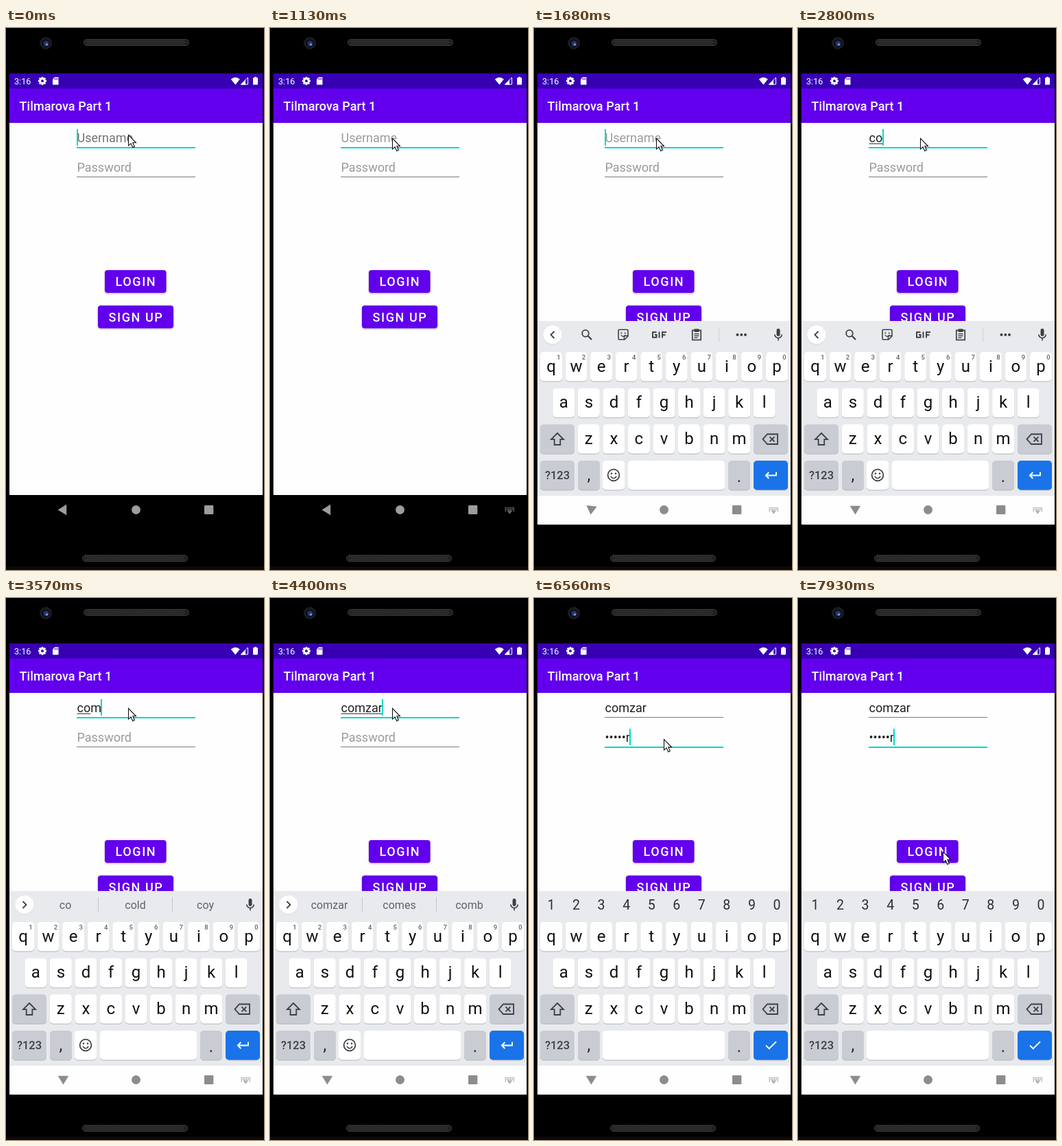
An HTML page with a canvas for the animation above (8 s loop, 376 by 788 pixels).

```html
<!DOCTYPE html>
<html lang="en">
<head>
<meta charset="utf-8">
<title>Login screen</title>
<style>
html, body { margin: 0; width: 100%; height: 100%; overflow: hidden; background: #000; }
canvas { display: block; width: 376px; height: 788px; }
</style>
</head>
<body>
<canvas id="stage"></canvas>
<script>
const W = 376, H = 788, LOOP = 8000;
const canvas = document.getElementById('stage');
const ctx = canvas.getContext('2d');
const ratio = window.devicePixelRatio || 1;
canvas.width = W * ratio;
canvas.height = H * ratio;

const PURPLE = '#6200ee', TEAL = '#03dac5', INK = '#212121', HINT = '#9b9b9b', ICON = '#3c4043';

// Each timeline lists [start in ms, value]; the value holds until the next one.
const userText = [[0, ''], [2340, 'c'], [2800, 'co'], [3450, 'com'], [4010, 'comz'], [4160, 'comza'], [4280, 'comzar']];
const composed = [[0, 0], [2800, 2], [3860, 3], [4160, 4], [4400, 6], [5200, 0]];
const passText = [[0, ''], [5630, '•o'], [6030, '••m'], [6310, '••••a'], [6560, '•••••r']];
const caretOn = [[0, true], [150, false], [700, true], [1130, false], [1680, true], [7020, false], [7540, true]];
const barWords = [[0, null], [3050, ['co', 'cold', 'coy']], [3860, ['com', 'come', 'comb']],
  [4400, ['comzar', 'comes', 'comb']], [5200, []]];
const pointer = [[0, [178, 155]], [580, [178, 160]], [4780, [180, 170]], [4930, [184, 218]], [5080, [189, 205]],
  [6870, [209, 242]], [7020, [211, 290]], [7140, [213, 326]], [7290, [211.5, 363]], [7540, [212, 384]], [7930, [211, 368.5]]];
const backTurn = [[0, 0], [1680, -83], [1800, -90]];

function at(line, t) {
  let value = line[0][1];
  for (const [start, v] of line) if (t >= start) value = v;
  return value;
}

function rect(x, y, w, h, color) {
  ctx.fillStyle = color;
  ctx.fillRect(x, y, w, h);
}

function round(x, y, w, h, r, color) {
  ctx.fillStyle = color;
  ctx.beginPath();
  ctx.roundRect(x, y, w, h, r);
  ctx.fill();
}

function disc(x, y, r, color) {
  ctx.fillStyle = color;
  ctx.beginPath();
  ctx.arc(x, y, r, 0, 7);
  ctx.fill();
}

function ring(x, y, r, width, color, from = 0, to = Math.PI * 2) {
  ctx.strokeStyle = color;
  ctx.lineWidth = width;
  ctx.beginPath();
  ctx.arc(x, y, r, from, to);
  ctx.stroke();
}

function shape(d, fill, stroke, width = 1) {
  const path = new Path2D(d);
  if (fill) { ctx.fillStyle = fill; ctx.fill(path); }
  if (stroke) { ctx.strokeStyle = stroke; ctx.lineWidth = width; ctx.stroke(path); }
}

function text(str, x, y, size, color, { weight = 400, align = 'left', gap = 0 } = {}) {
  ctx.font = `${weight} ${size}px Roboto, sans-serif`;
  ctx.letterSpacing = gap + 'px';
  ctx.textAlign = align;
  ctx.fillStyle = color;
  ctx.fillText(str, x, y);
}

function widthOf(str) {
  ctx.font = '400 18px Roboto, sans-serif';
  ctx.letterSpacing = '0px';
  return ctx.measureText(str).width;
}

function moved(x, y, draw, turn = 0) {
  ctx.save();
  ctx.translate(x, y);
  ctx.rotate(turn * Math.PI / 180);
  draw();
  ctx.restore();
}

function grille(x, y) {
  round(x, y, 154, 10, 5, '#3a3a3a');
  round(x + 1, y + 1, 152, 8, 4, '#202020');
  for (let row = 0; row < 3; row++)
    for (let i = 0; i < 48; i++)
      rect(x + 4 + i * 3 + (row % 2) * 1.5, y + 2 + row * 2.2, 1.4, 1.4, '#414141');
}

function phone() {
  rect(0, 0, W, H, '#000');
  grille(113, 16);
  grille(111, 766);
  rect(0, 783, W, 5, '#0b090c');
  disc(58, 22, 9, '#1b1c1e');
  disc(58, 22, 6, '#0c1120');
  disc(58.5, 22.5, 3.8, '#23366f');
  disc(59.5, 24, 1.7, '#7b92d2');
}

function statusBar() {
  rect(5, 66, 369, 22, '#3700b3');
  text('3:16', 12, 81.5, 12.6, '#fff');
  for (let i = 0; i < 8; i++) moved(53, 77, () => rect(-1.4, -6, 2.8, 3, '#fff'), i * 45);
  ring(53, 77, 3.3, 2.6, '#fff');
  shape('M71 71.5H76.5V82.5H68V74.5Z', '#fff');
  for (const x of [71, 73, 75]) rect(x - 0.4, 73, 1, 2.4, '#3700b3');
  shape('M327.8 74.5Q334.3 69 340.8 74.5L334.3 82.5Z', '#fff');
  shape('M352.5 72V82H342.5Z', null, '#fff', 1);
  shape('M349 75.5V82.5H342Z', '#fff');
  round(360, 72.3, 7, 10.2, 1, '#fff');
  rect(362, 71, 3, 2, '#fff');
}

function button(x, y, w, h, label) {
  ctx.save();
  ctx.shadowColor = 'rgba(0,0,0,.35)';
  ctx.shadowBlur = 3 * ratio;
  ctx.shadowOffsetY = ratio;
  round(x, y, w, h, 4, PURPLE);
  ctx.restore();
  text(label, x + 15.5, y + 23.3, 18, '#fff', { weight: 500, gap: 1.6 });
}

function field(y, value, hint, hintColor, focused, caret, lined = 0) {
  const x = 103.5;
  text(value || hint, x, y, 18, value ? INK : hintColor);
  if (lined) rect(x, y + 1.7, widthOf(value.slice(0, lined)), 1, INK);
  if (focused) rect(103, y + 7, 173, 2, TEAL);
  else rect(103, y + 7, 173, 1, '#7a7a7a');
  if (focused && caret) rect(Math.round(x + widthOf(value) - 0.5), y - 19, 2, 24, TEAL);
}

function page(t) {
  rect(5, 138, 369, t >= 1560 ? 584 : 541, '#fefefe');
  statusBar();
  rect(5, 88, 369, 50, PURPLE);
  text('Tilmarova Part 1', 19.5, 119.5, 18, '#fff', { weight: 500, gap: 0.1 });
  const onPass = t >= 5200, caret = at(caretOn, t);
  field(166, at(userText, t), 'Username', t < 150 ? '#737373' : HINT, !onPass, caret, at(composed, t));
  field(209, at(passText, t), 'Password', HINT, onPass, caret);
  button(144, 352, 89.5, 33, 'LOGIN');
  button(134, 403.5, 110, 33, 'SIGN UP');
}

function key(x, y, w, color = '#fff') {
  round(x, y + 1, w, 42.5, 5, '#b4b7bb');
  round(x, y, w, 42.5, 5, color);
}

function letters(row, x, y, hints) {
  [...row].forEach((ch, i) => {
    const cx = x + i * 36.55;
    key(cx - 16, y, 32);
    text(ch, cx, y + 28.5, 24, '#111', { align: 'center' });
    if (hints) text((i + 1) % 10, cx + 11, y + 10.5, 9.5, '#5f6368', { align: 'center', weight: 500 });
  });
}

function chevron(right) {
  disc(27, 447, 13.5, '#d3d5d8');
  disc(27, 446, 13.5, '#fff');
  const s = right ? 1 : -1;
  shape(`M${27 - 2.5 * s} 441L${27 + 2.5 * s} 446L${27 - 2.5 * s} 451`, null, ICON, 1.8);
}

function mic() {
  round(353.5, 437, 5, 11, 2.5, ICON);
  ring(356, 445.5, 5.2, 1.6, ICON, 0, Math.PI);
  rect(355.2, 450.5, 1.6, 4, ICON);
}

function tools() {
  ring(75, 444, 4.8, 1.8, ICON);
  shape('M78.5 447.5L84 453', null, ICON, 2.2);
  shape('M124.5 438.5H135.5Q137 438.5 137 440V448L132 453H124.5Q123 453 123 451.5V440Q123 438.5 124.5 438.5Z', null, ICON, 1.6);
  shape('M137 447.5H131.5V453', null, ICON, 1.4);
  disc(127.3, 443.5, 1.1, ICON);
  disc(132.7, 443.5, 1.1, ICON);
  ring(130, 445.5, 3, 1.3, ICON, 0.2, 2.9);
  shape('M178.5 442.3H173V449.7H178.5V446H176M182.5 441.5V450.5M187 450.5V442.3H193M187 446.3H191.5', null, ICON, 1.9);
  ctx.strokeStyle = ICON;
  ctx.lineWidth = 1.7;
  ctx.strokeRect(230.8, 439.5, 12.4, 14);
  rect(233.5, 437.5, 7, 4.5, ICON);
  for (const y of [444, 446.8, 449.6]) rect(233.5, y, y > 449 ? 5 : 7, 1.4, ICON);
  rect(269, 436, 1, 20, '#cfd1d5');
  for (const x of [296.5, 302.3, 308]) disc(x, 446, 2, ICON);
}

function topRow(t) {
  if (t >= 5320) {
    for (let i = 0; i < 10; i++)
      text((i + 1) % 10, 25 + i * 36.55, 453, 19.5, '#2c2e31', { align: 'center' });
    return;
  }
  const words = at(barWords, t);
  chevron(words);
  mic();
  if (!words) return tools();
  words.forEach((word, i) => text(word, 86.5 + i * 102, 451.7, 16, '#5f6368', { align: 'center' }));
  if (words.length) for (const x of [134, 242]) rect(x, 435, 1, 21, '#c3c6ca');
}

function keyboard(t) {
  const numeric = t >= 5320, gray = '#c9ccd3';
  rect(5, 426, 369, 254, '#e8eaed');
  topRow(t);
  letters('qwertyuiop', 25, 471, !numeric);
  letters('asdfghjkl', 43.3, 523.7);
  letters('zxcvbnm', 79.8, 576.3);

  key(9, 576.3, 50, gray);
  shape('M34 589L43 598.2H38.3V606H29.7V598.2H25Z', null, ICON, 1.8);
  key(320, 576.3, 50, gray);
  shape('M340 590.5H355V605H340L333.5 597.8Z', null, ICON, 1.8);
  shape('M343.5 594.3L350.5 601.3M350.5 594.3L343.5 601.3', null, ICON, 1.8);

  key(9, 629, 50, gray);
  text('?123', 34, 656.3, 16.5, ICON, { weight: 500, align: 'center' });
  key(64, 629, 32, gray);
  text(',', 79.8, 658, 24, '#222', { align: 'center' });
  if (!numeric) {
    key(100, 629, 32);
    ring(116, 650, 8.4, 1.7, ICON);
    disc(113, 647.7, 1.3, ICON);
    disc(119, 647.7, 1.3, ICON);
    ring(116, 650.7, 4, 1.6, ICON, 0.25, 2.9);
  }
  key(numeric ? 100 : 137, 629, numeric ? 178 : 141);
  key(283, 629, 32, gray);
  text('.', 299, 660, 24, '#222', { align: 'center' });
  key(320, 629, 50, '#1a73e8');
  if (numeric) shape('M338 650.5L342.7 655.2L353 645', null, '#fff', 1.9);
  else shape('M353 645.5V650.5H338M342.3 646L337.8 650.5L342.3 655', null, '#fff', 1.9);
}

function navBar(t) {
  const color = t >= 1560 ? '#8c8c8c' : '#9d9d9d';
  moved(83, 700, () => shape('M-7.5 .5L5.2 -7.3V8.2Z', color), at(backTurn, t));
  disc(189.5, 700.5, 6.5, color);
  round(289, 694, 13.3, 13, 1, color);
  if (t < 850) return;
  for (let row = 0; row < 3; row++)
    for (let i = 0; i < 6; i++)
      if (row < 2 || i === 0 || i === 5) rect(342.5 + i * 2.4, 697 + row * 2.3, 1.4, 1.3, color);
  rect(346, 701.6, 6.5, 1.3, color);
  shape('M346.8 703.7H351.8L349.3 706Z', color);
}

function arrow(t) {
  const [x, y] = at(pointer, t);
  moved(x + 0.5, y + 0.5, () =>
    shape('M0 0V15.6L3.6 12.4L6.2 18.2L8.8 17L6.3 11.3H11Z', '#fff', '#111', 1.1));
}

function draw(t) {
  ctx.setTransform(ratio, 0, 0, ratio, 0, 0);
  phone();
  page(t);
  if (t >= 1560) moved(0, t < 1680 ? 19 : 0, () => keyboard(t));
  navBar(t);
  arrow(t);
}

function tick(now) {
  draw(now % LOOP);
  requestAnimationFrame(tick);
}
draw(0);
requestAnimationFrame(tick);
</script>
</body>
</html>
```
